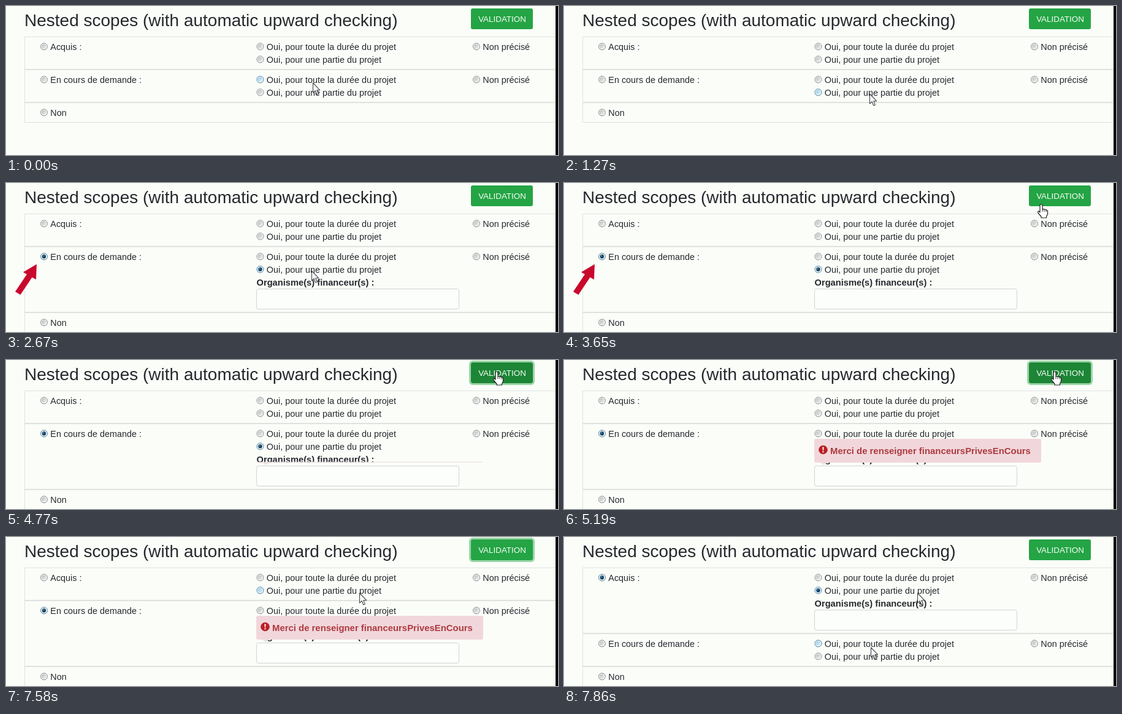
Animation of 900x244 px, one loop 8000 ms. Source, as an HTML page:

```html
<!DOCTYPE html>
<html lang="fr">
<head>
<meta charset="utf-8">
<title>Nested scopes</title>
<style>
html, body { margin: 0; width: 100%; height: 100%; overflow: hidden; background: #fbfdf9; }
svg { display: block; width: 900px; height: 244px; font: 14.4px "Liberation Sans", Arial, sans-serif; fill: #25292d; }
</style>
</head>
<body>
<svg id="stage" viewBox="0 0 900 244">
  <defs>
    <linearGradient id="plain" x2="1" y2="1"><stop stop-color="#b4b9b8"/><stop offset="1" stop-color="#f4f6f4"/></linearGradient>
    <linearGradient id="hot" x2="1" y2="1"><stop stop-color="#8cc9ea"/><stop offset="1" stop-color="#e6f7fd"/></linearGradient>
    <clipPath id="bubbleBox"><path d="M400 128H790V168H400z"/></clipPath>
  </defs>
  <g id="scene"></g>
</svg>
<script>
const LOOP = 8000, STEP = 140, BG = '#fbfdf9';
const OPEN = 1410, SWITCH = 7860;
const scene = document.getElementById('scene');

// Pointer track: time, x, y
const track = [
  [0, 500, 126], [10, 500, 126], [140, 498, 121], [850, 498, 121], [1270, 498, 144],
  [3090, 498, 144], [3370, 600, 108], [3510, 705, 66], [3650, 778, 35],
  [3790, 797, 22], [3930, 800, 19], [6600, 800, 19], [6740, 735, 48],
  [6880, 612, 78], [7160, 580, 91], [7300, 576, 92], [LOOP, 576, 92]
];

const ramp = (t, a, b) => Math.min(1, Math.max(0, (t - a) / (b - a)));
const within = (t, a, b) => t >= a && t < b;

function pointerAt(t) {
  const i = Math.max(1, track.findIndex(k => k[0] >= t));
  const [a, x0, y0] = track[i - 1], [b, x1, y1] = track[i];
  const p = ramp(t, a, b);
  return [x0 + (x1 - x0) * p, y0 + (y1 - y0) * p];
}

const text = (x, y, s, attrs = '') => `<text x="${x}" y="${y}" ${attrs}>${s}</text>`;

function radio(x, y, label, on, hot) {
  const dot = on ? `<circle cx="${x}" cy="${y}" r="3.1" fill="#123f63"/><circle cx="${x - .8}" cy="${y - .9}" r="1" fill="#62b3d8"/>` : '';
  const edge = hot || on ? '#4a7f9f' : '#858b8b';
  return `<circle cx="${x}" cy="${y}" r="5.5" fill="#f6f8f6" stroke="${edge}"/>
    <circle cx="${x}" cy="${y}" r="3.9" fill="url(#${hot ? 'hot' : 'plain'})"/>${dot}` +
    text(x + 10.3, y + 5.6, label);
}

const rule = (y, h) => `<path d="M31 ${y}H896v${h}H31z" fill="#dfe2df"/>`;

function scopeRow(y, name, open, hotAll, hotPart) {
  let s = radio(62, y + 16.4, name, open) +
    radio(414.5, y + 16.4, 'Oui, pour toute la durée du projet', false, hotAll) +
    radio(414.5, y + 37.4, 'Oui, pour une partie du projet', open, hotPart) +
    radio(767, y + 16.4, 'Non précisé');
  if (open) {
    s += text(408.5, y + 64, 'Organisme(s) financeur(s) :', 'font-weight="bold" font-size="14.7"') +
      `<rect x="408.5" y="${y + 69.5}" width="330" height="33" rx="3" fill="#fcfefb" stroke="#cfd4d6"/>`;
  }
  return s;
}

function button(t) {
  const ring = within(t, 4350, SWITCH)
    ? `<rect x="756.5" y="2.5" width="104" height="37" rx="4.5" fill="none" stroke="#28a745" stroke-width="3" opacity="${.45 * ramp(t, 4210, 4490)}"/>` : '';
  const fill = within(t, 3790, 6740) ? '#1d8536' : '#24a445';
  return ring + `<rect x="758" y="4" width="101" height="34" rx="3" fill="${fill}"/>` +
    text(809, 26, 'VALIDATION', 'text-anchor="middle" font-size="13.4" fill="#f4fff5"');
}

function bubble(t) {
  if (!within(t, 4770, SWITCH)) return '';
  const p = ramp(t, 4770, 5190);
  const cover = p < 1 ? `<path d="M408 167.5H776V172H408z" fill="${BG}"/>` : '';
  return cover + `<path d="M418 168H429L423.5 172z" fill="#f1dfe0"/>
    <g clip-path="url(#bubbleBox)"><g transform="translate(0 ${37.5 * (1 - p)})" opacity="${.7 + .3 * p}">
      <rect x="408" y="129" width="370" height="39" rx="3" fill="#f1d7db"/>
      <circle cx="422.5" cy="147" r="6.8" fill="#c01c22" stroke="#98161b" stroke-width=".8"/>
      <path d="M421.3 142.4h2.4l-.5 5.6h-1.4zM421.4 149.2h2.2v2h-2.2z" fill="#fff"/>
      ${text(434, 154, 'Merci de renseigner financeursPrivesEnCours', 'font-weight="bold" font-size="14.9" fill="#ad3a40"')}
    </g></g>`;
}

const place = (x, y, body) => `<g transform="translate(${x} ${y})" stroke-linejoin="round">${body}</g>`;

const arrowPointer = (x, y) => place(x + .5, y,
  '<path d="M0 0V16L3.7 12.7 6.2 19 8.8 17.9 6.3 11.7H11.2z" fill="#fbfdfb" fill-opacity=".9" stroke="#42464a" stroke-width="1.1"/>');

const handPointer = (x, y) => place(x, y,
  `<path d="M-2 2Q-2 0 0 0T2 2V8Q3.5 7 5 8.3Q7 7.5 8 9.3Q10 8.8 10.5 11V16L8.5 20V22H0V20L-5 14Q-6 11-4 11L-2 13Z" fill="#fff" stroke="#222" stroke-width="1.2"/>
   <path d="M2 8v4M5 8.5v3.5M8 9.5v3" fill="none" stroke="#222" stroke-width=".9"/>`);

function pointer(t) {
  const [x, y] = pointerAt(t);
  const onButton = within(x, 758, 859) && within(y, 4, 38);
  return (onButton ? handPointer : arrowPointer)(x, y);
}

function draw(t) {
  const late = t >= SWITCH, mid = within(t, OPEN, SWITCH);
  const row2 = late ? 158 : 104, row3 = t >= OPEN ? 212 : 158;
  const mark = ramp(t, 2110, 2670) * (1 - ramp(t, 3650, 4070));
  scene.innerHTML =
    `<path d="M0 0H900V244H0z" fill="${BG}"/><path d="M896 0h4V244h-4z" fill="#000"/>` +
    text(30, 33, 'Nested scopes (with automatic upward checking)', 'font-size="28"') +
    button(t) +
    `<path d="M30 50h1V${row3 + 33}h-1z" fill="#dfe2df"/>` +
    rule(50, 1) + rule(row2 - 1, 2) + rule(row3 - 1, 2) + rule(row3 + 32, 1) +
    scopeRow(50, 'Acquis :', late, within(t, 6880, 7160), t >= 7160) +
    scopeRow(row2, 'En cours de demande :', mid, t < 1270 || late, within(t, 1270, 3370)) +
    radio(62, row3 + 16.4, 'Non') +
    bubble(t) +
    `<path d="M50 133L28 146 34 149.500 15 178 23.500 183 42.500 154.500 49 158z" fill="#c8082c" opacity="${mark}"/>` +
    (late ? arrowPointer(500, 181) : '') +
    pointer(t);
}

// The picture is held for one step at a time
function hold(t) {
  const base = t < 6740 ? 10 : 20;
  return within(t, 140, 150) ? 140 : Math.max(0, Math.floor((t - base) / STEP) * STEP + base);
}

let shown = -1;
function frame(now) {
  const t = hold(now % LOOP);
  if (t !== shown) draw(shown = t);
  requestAnimationFrame(frame);
}
frame(performance.now());
</script>
</body>
</html>
```
